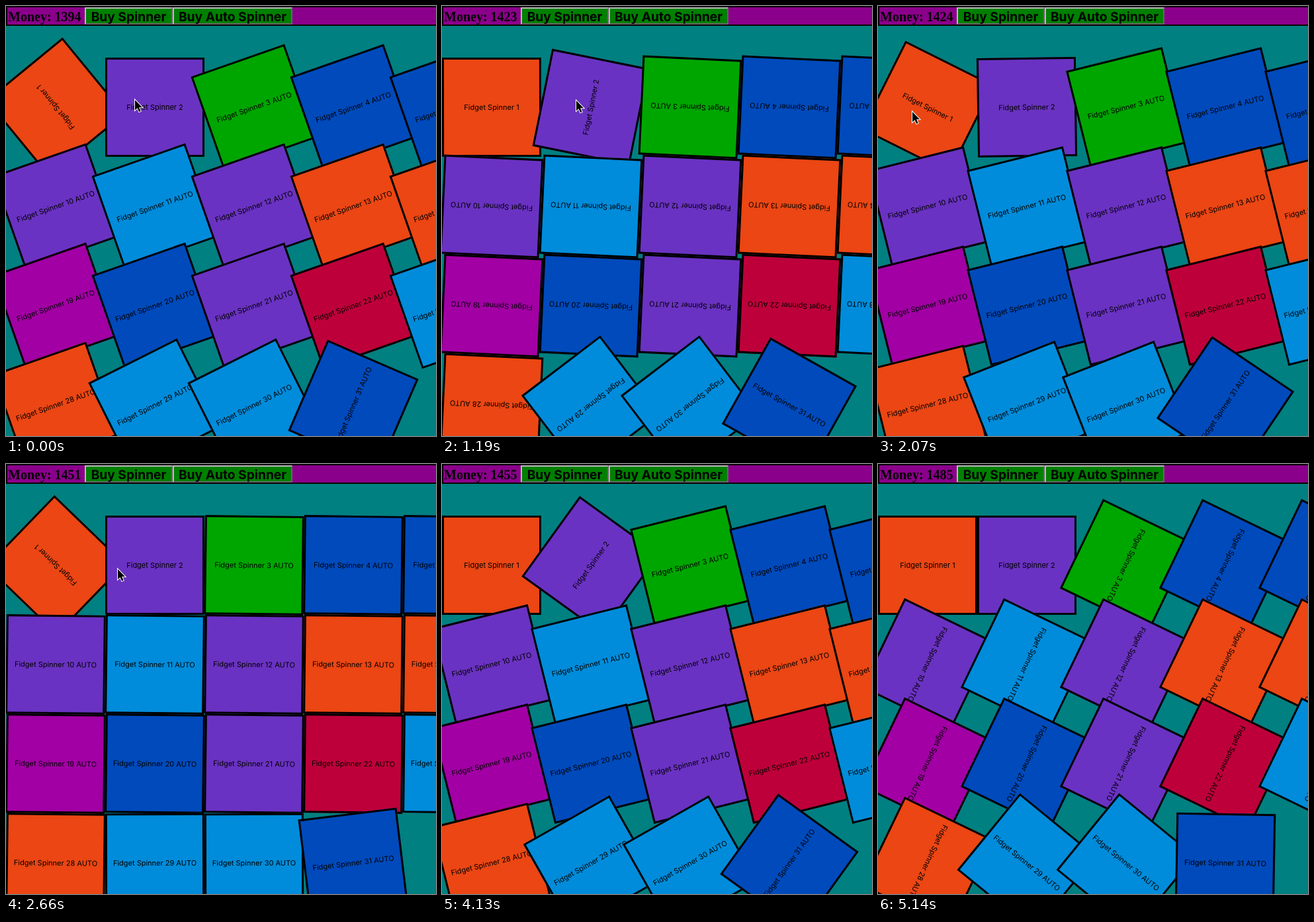
Animation of 650x650 px, one loop 5.24 s. Source, as an HTML page:

```html
<!DOCTYPE html>
<html lang="en">
<head>
<meta charset="utf-8">
<title>Fidget Spinners</title>
<style>
html, body { margin: 0; width: 100%; height: 100%; overflow: hidden; background: #008080; }
#stage { position: relative; width: 650px; height: 650px; overflow: hidden; background: #008080; }
#stage * { position: absolute; box-sizing: border-box; white-space: nowrap; }
#bar { left: 0; top: 0; width: 1350px; height: 30px; background: #8b008b; border: 2px solid #000; }
#money { left: 1px; top: -1px; font: bold 20px/30px "Liberation Serif", Times, serif; }
.buy {
  top: 0; height: 26px; background: #008000; border: 2px outset #bbb;
  font: bold 19.2px/24px Inter, sans-serif; text-align: center;
}
.tile {
  width: 150px; height: 150px; border: 3px solid #000;
  font: 11px/144px Inter, sans-serif; text-align: center;
}
#cursor { left: 0; top: 0; overflow: visible; }
</style>
</head>
<body>
<div id="stage">
  <div id="bar">
    <div id="money"></div>
    <div class="buy" style="left:117px;width:133px"><span style="position:static">Buy Spinner</span></div>
    <div class="buy" style="left:250px;width:181px"><span style="position:static">Buy Auto Spinner</span></div>
  </div>
  <svg id="cursor" width="14" height="20">
    <path d="M0 0V15.5L3.6 12.2 6.2 18 8.6 17 6.1 11.2H11Z" stroke="#fff" stroke-width="2" paint-order="stroke"/>
  </svg>
</div>
<script>
const LOOP = 5240, SPIN = 2000, COLUMNS = 9, COUNT = 31, BASE_MONEY = 1394;
const stage = document.getElementById('stage');
const money = document.getElementById('money');
const cursor = document.getElementById('cursor');

const orange = '#eb4613', purple = '#6a32c2', green = '#00a600', blue = '#004abc',
      sky = '#008cdb', magenta = '#a200a4', red = '#be003a';
const colors = {
  1: orange, 2: purple, 3: green, 4: blue, 5: blue,
  10: purple, 11: sky, 12: purple, 13: orange, 14: orange,
  19: magenta, 20: blue, 21: purple, 22: red, 23: sky,
  28: orange, 29: sky, 30: sky, 31: blue
};

// Spinners that were started together; times are on the game clock.
const groups = [
  { from: 1, to: 1, starts: [682, 3378] },
  { from: 2, to: 2, starts: [1679, 4490] },
  { from: 3, to: 28, starts: [0, 2045, 4090, 6135] },
  { from: 29, to: 30, starts: [88, 2150, 4287, 6340] },
  { from: 31, to: 31, starts: [400, 2457, 4490, 6545] }
];

const clock = [[0, 1426], [1190, 2639], [2070, 3549], [2660, 4099],
               [3390, 4886], [4130, 5604], [5140, 6558]];
const mouse = [[0, 195, 142], [300, 195, 142], [600, 203, 143], [1340, 203, 143],
               [1800, 52, 160], [2220, 52, 160], [2660, 169, 159], [3060, 182, 161],
               [3390, 354, 315], [3830, 700, 520], [LOOP, 700, 520]];

// The picture is refreshed only at these moments.
const run = (a, b) => Array.from({ length: 8 }, (_, i) => Math.floor((a + (b - a) * i / 7) / 10) * 10);
const ticks = [0, ...run(150, 1190), ...run(1340, 2370), ...run(2520, 3540), ...run(3680, 4720), 4870, 5140];

for (const g of groups) {
  g.tiles = [];
  for (let n = g.from; n <= g.to; n++) {
    const tile = document.createElement('div');
    tile.className = 'tile';
    tile.textContent = 'Fidget Spinner ' + n + (n > 2 ? ' AUTO' : '');
    tile.style.left = (n - 1) % COLUMNS * 150 + 'px';
    tile.style.top = 78 + Math.floor((n - 1) / COLUMNS) * 150 + 'px';
    tile.style.background = colors[n] || purple;
    stage.insertBefore(tile, cursor);
    g.tiles.push(tile);
  }
}

// CSS "ease", cubic-bezier(.25, .1, .25, 1)
function ease(x) {
  let lo = 0, hi = 1, s;
  for (let i = 0; i < 24; i++) {
    s = (lo + hi) / 2;
    if (.75 * s * (1 - s) + s ** 3 < x) lo = s; else hi = s;
  }
  return .3 * s * (1 - s) ** 2 + 3 * (1 - s) * s * s + s ** 3;
}

function sample(keys, t, column) {
  let i = 1;
  while (i < keys.length - 1 && keys[i][0] < t) i++;
  const a = keys[i - 1], b = keys[i];
  return a[column] + (b[column] - a[column]) * (t - a[0]) / (b[0] - a[0]);
}

function draw() {
  const now = performance.now() % LOOP;
  const t = ticks.filter(k => k <= now).pop();
  const time = sample(clock, t, 1);
  let total = BASE_MONEY;
  for (const { starts, tiles } of groups) {
    let angle = 0;
    for (const start of starts) {
      const end = start + SPIN;
      if (time >= start && time < end) angle = 360 * ease((time - start) / SPIN);
      if (end > clock[0][1] && end <= time) total += tiles.length;
    }
    for (const tile of tiles) tile.style.transform = `rotate(${angle}deg)`;
  }
  money.textContent = 'Money: ' + total;
  cursor.style.transform = `translate(${sample(mouse, t, 1)}px, ${sample(mouse, t, 2)}px)`;
  requestAnimationFrame(draw);
}
draw();
</script>
</body>
</html>
```
